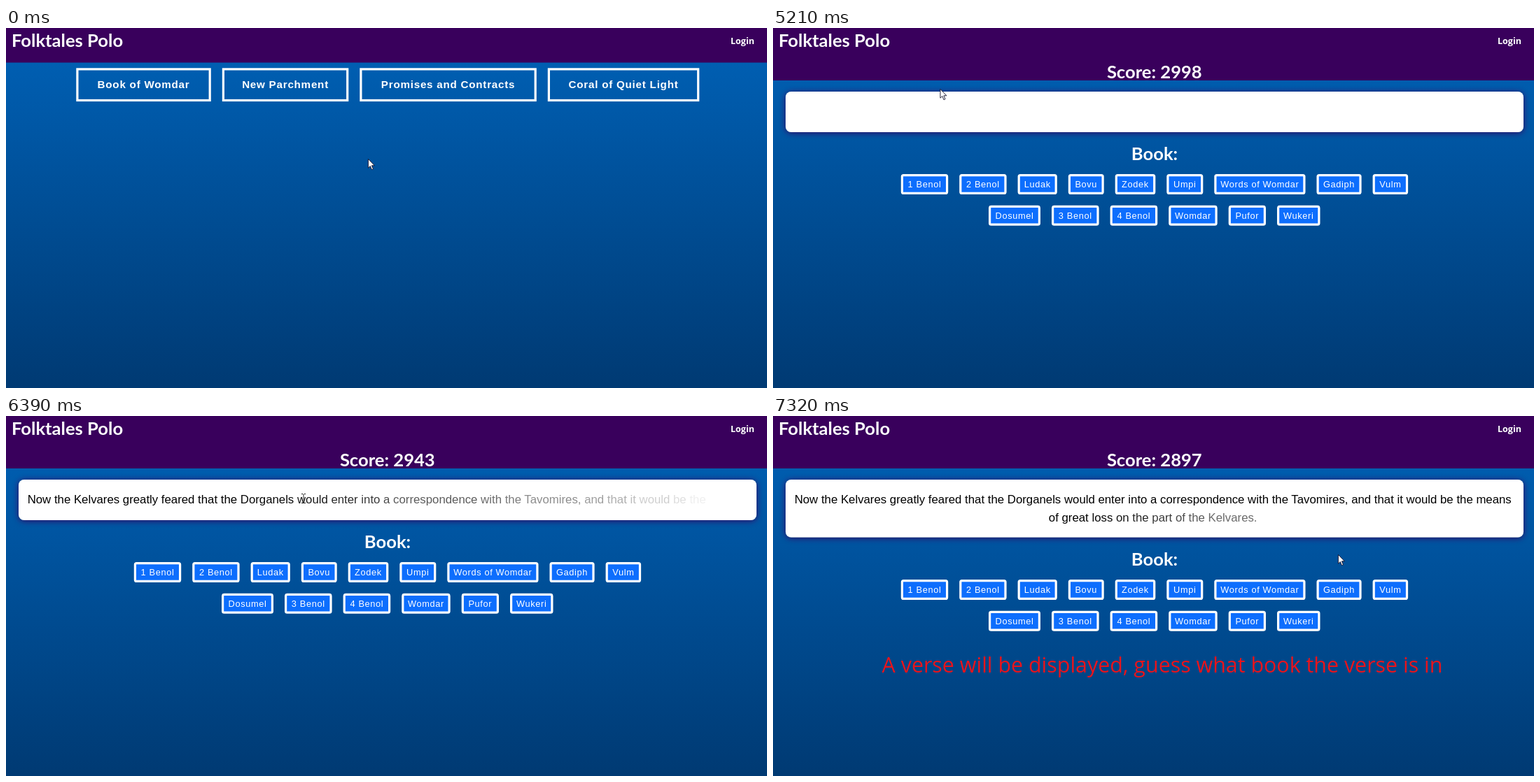
Write an HTML page that moves like this. It is 1087 px wide and 515 px high and loops after 8000 ms.

```html
<!DOCTYPE html>
<html lang="en">
<head>
<meta charset="utf-8">
<title>Verse game</title>
<style>
  html, body { margin: 0; width: 100%; height: 100%; overflow: hidden; background: #003a73; }
  svg { display: block; width: 1087px; height: 515px; }
  text { white-space: pre; }
  .head { font: 700 25.6px Lato, sans-serif; fill: #fff; }
  .login { font: 700 12.6px "Open Sans", "Noto Sans", sans-serif; fill: #fff; }
  .menu { font: 700 15.2px "Liberation Sans", Arial, sans-serif; letter-spacing: .76px; fill: #fff; }
  .chip { font: 12.8px "Liberation Sans", Arial, sans-serif; letter-spacing: .64px; fill: #fff; }
  .verse { font: 16.8px "Liberation Sans", Arial, sans-serif; fill: #000; }
  .hint { font: 30.4px "Open Sans", "Noto Sans", sans-serif; fill: #e8141c; }
  .mid { text-anchor: middle; }
</style>
</head>
<body>
<svg id="stage" viewBox="0 0 1087 515">
  <defs>
    <linearGradient id="sky" x1="0" y1="0" x2="0" y2="1">
      <stop offset="0" stop-color="#0062b8"/>
      <stop offset="1" stop-color="#003a73"/>
    </linearGradient>
    <filter id="glow" x="-5%" y="-50%" width="110%" height="200%">
      <feDropShadow dx="0" dy="1" stdDeviation="5" flood-color="#39005c" flood-opacity=".95"/>
    </filter>
  </defs>
  <rect width="1087" height="515" fill="url(#sky)"/>
  <rect id="bar" width="1087" height="49.5" fill="#39005c"/>
  <text class="head" x="8" y="27">Folktales Polo</text>
  <text class="login mid" x="1052" y="22.5">Login</text>

  <g id="menu">
    <text class="hint mid" id="hint1" x="542.5" y="211.7">Select the Book of Scripture you want to play with</text>
  </g>

  <g id="game">
    <text class="head mid" id="score" x="544.8" y="71.5"></text>
    <rect id="card" x="18" y="91" width="1054" height="58" rx="8" fill="#fff" filter="url(#glow)"/>
    <g id="books">
      <text class="head mid" x="545" y="189">Book:</text>
    </g>
    <text class="hint mid" id="hint2" x="556" y="366.7">A verse will be displayed, guess what book the verse is in</text>
  </g>

  <path id="arrow" d="M0.4 0.4V13.2L3.3 10.5L5.4 15.6L7.5 14.7L5.4 9.8H9.4Z" fill="#fff" stroke="#10102a" stroke-width=".9"/>
  <path id="beam" d="M-3 -6.5H-1L0 -5.5L1 -6.5H3M0 -5.5V5.5M-3 6.5H-1L0 5.5L1 6.5H3" fill="none" stroke="#222" stroke-width="1"/>
</svg>
<script>
const LOOP = 8000, GAME = 5210, GAP = 16, LINE = 25;
const $ = id => document.getElementById(id);

function add(parent, tag, attrs, text = '') {
  const el = document.createElementNS('http://www.w3.org/2000/svg', tag);
  for (const key in attrs) el.setAttribute(key, attrs[key]);
  el.textContent = text;
  parent.appendChild(el);
  return el;
}

// Lays out a row of bordered buttons; items are [label, outer width].
function buttonRow(parent, cls, x, y, h, base, border, box, items) {
  return items.map(([label, w]) => {
    const rect = add(parent, 'rect', {
      x: x + border / 2, y: y + border / 2, width: w - border, height: h - border,
      stroke: '#fff', 'stroke-width': border, ...box
    });
    add(parent, 'text', { class: cls + ' mid', x: x + w / 2, y: y + base }, label);
    x += w + GAP;
    return rect;
  });
}

const [firstButton] = buttonRow($('menu'), 'menu', 100.3, 57.3, 47.8, 28.9, 3.2, { fill: 'none' }, [
  ['Book of Womdar', 192.5], ['New Parchment', 180.5],
  ['Promises and Contracts', 252.5], ['Coral of Quiet Light', 216.5]
]);

const chipBox = { fill: '#0d6efd', rx: 2 };
const chipRow = (x, y, items) => buttonRow($('books'), 'chip', x, y, 29, 18.8, 3.2, chipBox, items);
chipRow(182.8, 209, [
  ['1 Benol', 67.4], ['2 Benol', 67.4], ['Ludak', 56.2], ['Bovu', 50.9], ['Zodek', 57.6],
  ['Umpi', 52], ['Words of Womdar', 130.2], ['Gadiph', 64.1], ['Vulm', 50.5]
]);
chipRow(308, 253.8, [
  ['Dosumel', 74], ['3 Benol', 67.6], ['4 Benol', 67.6], ['Womdar', 69.5], ['Pufor', 53.3], ['Wukeri', 61.5]
]);

const verse = [
  'Now the Kelvares greatly feared that the Dorganels would enter into a correspondence with the Tavomires, and that it would be the means',
  'of great loss on the part of the Kelvares.'
];
const words = verse.flatMap((line, row) => {
  const el = add($('game'), 'text', { class: 'verse mid', x: 542.7, y: 125.3 + row * 25.4 });
  return line.split(' ').map((word, i) => ({ row, text: (i ? ' ' : '') + word, span: add(el, 'tspan', {}) }));
});
const wordTime = i => 5205 + 51.5 * (i + 1);
const wrapTime = wordTime(words.findIndex(w => w.row === 1));

const pointer = [
  [390, 517, 187], [1140, 239, 87], [5650, 238.5, 87], [5950, 264, 101],
  [6390, 425, 118], [6840, 774, 174], [7320, 807, 198]
];
const scores = [[GAME, 2998], [5950, 2963], [6390, 2943], [6840, 2921], [7320, 2897], [LOOP, 2863]];

const clamp = v => Math.max(0, Math.min(1, v));
const smooth = v => v * v * (3 - 2 * v);

// Piecewise interpolation of one column of a key list.
function track(keys, t, col, ease = v => v) {
  let i = 0;
  while (i < keys.length - 2 && t >= keys[i + 1][0]) i++;
  const a = keys[i], b = keys[i + 1];
  return a[col] + (b[col] - a[col]) * ease(clamp((t - a[0]) / (b[0] - a[0])));
}

const show = (el, on) => el.setAttribute('display', on ? 'inline' : 'none');

function drawMenu(t) {
  const hover = clamp((t - 950) / 190);
  const mix = [57, 0, 92].map(c => Math.round(255 + (c - 255) * hover));
  firstButton.setAttribute('stroke', `rgb(${mix})`);
  show($('hint1'), t >= 1210);
}

function drawGame(t) {
  const shift = t >= wrapTime ? LINE : 0;
  $('score').textContent = 'Score: ' + Math.round(track(scores, t, 1));
  $('card').setAttribute('height', 58 + shift * 0.98);
  $('books').setAttribute('transform', `translate(0 ${shift})`);
  words.forEach((w, i) => {
    const age = t - wordTime(i);
    w.span.textContent = age >= 0 ? w.text : '';
    w.span.setAttribute('fill-opacity', clamp(age / 800));
  });
  show($('hint2'), t >= 7320);
}

function drawPointer(t) {
  const ease = t < 1140 ? smooth : undefined;
  const x = track(pointer, t, 1, ease), y = track(pointer, t, 2, ease);
  const overText = t > GAME && y > 106 && y < 158;
  for (const id of ['arrow', 'beam']) $(id).setAttribute('transform', `translate(${x} ${y})`);
  show($('arrow'), !overText);
  show($('beam'), overText);
}

function draw(t) {
  const playing = t >= GAME;
  show($('menu'), !playing);
  show($('game'), playing);
  $('bar').setAttribute('height', playing ? 75 : 49.5);
  if (playing) drawGame(t); else drawMenu(t);
  drawPointer(t);
}

let start;
function tick(now) {
  start ??= now;
  draw((now - start) % LOOP);
  requestAnimationFrame(tick);
}
draw(0);
requestAnimationFrame(tick);
</script>
</body>
</html>
```
